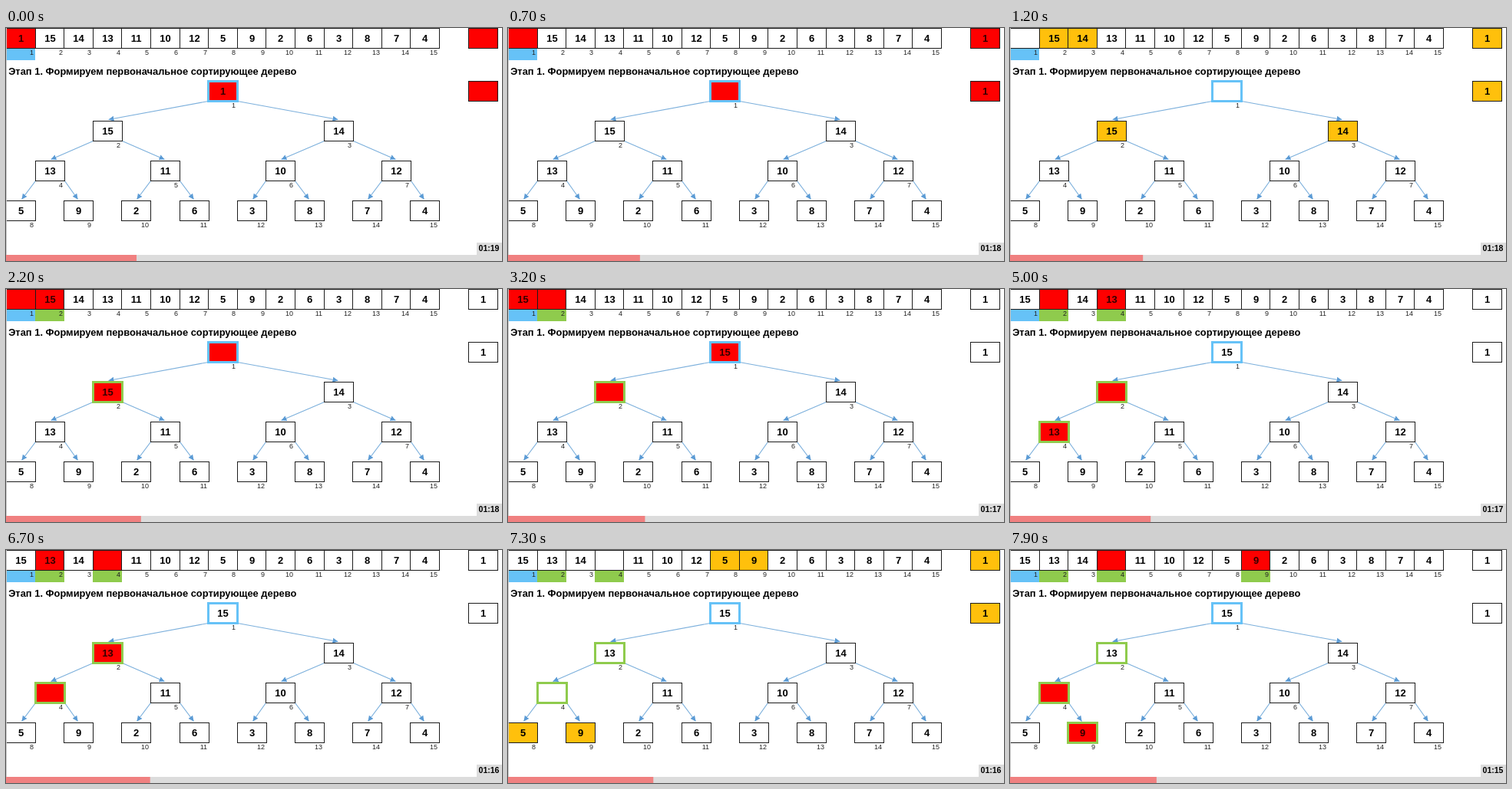
These frames come from a looping animation (646 by 304 pixels, 8 s). An HTML page:

```html
<!DOCTYPE html>
<html lang="ru">
<head>
<meta charset="utf-8">
<style>
  html, body { margin: 0; width: 100%; height: 100%; overflow: hidden; background: #fff; }
  svg { display: block; font-family: "Liberation Sans", Arial, sans-serif; }
  .value { font-size: 13px; font-weight: bold; text-anchor: middle; }
  .title { font-size: 12.9px; font-weight: bold; }
  .index { font-size: 9px; text-anchor: end; fill: #222; }
  .clock { font-size: 10.5px; font-weight: bold; text-anchor: middle; }
  .arrow { stroke: #7db0dc; stroke-width: 1.2; marker-end: url(#head); }
</style>
</head>
<body>
<svg width="646" height="304" viewBox="0 0 646 304">
  <defs>
    <marker id="head" markerUnits="userSpaceOnUse" markerWidth="8" markerHeight="8"
            refX="7" refY="3.5" orient="auto">
      <path d="M0 0L7 3.5L0 7z" fill="#5b9bd5"/>
    </marker>
  </defs>
  <text class="title" x="3.2" y="61">Этап 1. Формируем первоначальное сортирующее дерево</text>
  <g id="arrows"></g>
  <g id="cells"></g>
  <path d="M.5 0V296" stroke="#c4c4c4"/>
  <rect x="613" y="280" width="33" height="16" fill="#dcdcdc"/>
  <text class="clock" id="clock" x="629" y="291"></text>
  <rect y="296" width="646" height="8" fill="#dcdcdc"/>
  <rect id="bar" y="296" height="8" fill="#f08080"/>
</svg>
<script>
const LOOP = 8000, STEP = 950, LEAD = 800, CELL = 37.6;
const RED = '#fe0000', AMBER = '#ffc00c', BLUE = '#66c2f7', GREEN = '#8fcb4d', INK = '#1c1c1c';
const START = [1, 1, 15, 14, 13, 11, 10, 12, 5, 9, 2, 6, 3, 8, 7, 4];
const HOLES = [0, 1, 2, 4];   // slot 0 is the buffer on the right
const TRAIL = [1, 2, 4, 9];
const LIT = [[0, 1], [0, 1], [0, 2, 3], [1, 2], [1, 2], [0, 4, 5], [2, 4], [2, 4], [0, 8, 9], [4, 9]];
const $ = id => document.getElementById(id);

const left = col => Math.round(col * CELL) + .5;

// Left and top edge of a tree node
function node(i) {
  if (!i) return { x: left(16), y: 69.5 };
  const depth = Math.floor(Math.log2(i));
  const span = 16 >> depth;
  return { x: left((i - 2 ** depth) * span + span / 2 - 1), y: 69.5 + 52 * depth };
}

function drawArrows() {
  let out = '';
  for (let i = 2; i < 16; i++) {
    const from = node(i >> 1), to = node(i);
    out += `<line class="arrow" x1="${from.x + (i % 2 ? 38 : 0)}" y1="${from.y + 26}"
      x2="${to.x + (i % 2 ? 18 : 20)}" y2="${to.y - 2}"/>`;
  }
  $('arrows').innerHTML = out;
}

const box = (x, y, fill, stroke, width) =>
  `<rect x="${x}" y="${y}" width="38" height="26" fill="${fill}" stroke="${stroke}" stroke-width="${width}"/>`;
const value = (x, y, text, fill) =>
  `<text class="value" x="${x + 19}" y="${y + 17.5}" fill="${fill === RED ? '#300' : '#000'}">${text}</text>`;
const index = (x, y, i) => i ? `<text class="index" x="${x + 35.5}" y="${y + 34.8}">${i}</text>` : '';

function drawCells(step) {
  const shifts = Math.floor((step + 2) / 3);
  const values = [...START];
  for (let k = 1; k <= shifts; k++) values[HOLES[k - 1]] = values[HOLES[k]];
  values[HOLES[shifts]] = '';
  const trail = TRAIL.slice(0, 1 + Math.floor(step / 3));
  const glow = step % 3 === 2 ? AMBER : RED;

  let row = '', tree = '';
  values.forEach((text, i) => {
    const fill = LIT[step].includes(i) ? glow : '#fff';
    const mark = trail.includes(i) && (i === 1 ? BLUE : GREEN);
    const x = left(i ? i - 1 : 16), { x: nx, y: ny } = node(i);
    if (mark) row += `<rect x="${x - .5}" y="27" width="38" height="15" fill="${mark}"/>`;
    row += box(x, .5, fill, INK, 1) + value(x, .5, text, fill) + index(x, .5, i);
    tree += box(nx, ny, fill, mark || INK, mark ? 3 : 1) + value(nx, ny, text, fill) + index(nx, ny, i);
  });
  $('cells').innerHTML = row + tree;
}

let shown = -1;
function frame(now) {
  const t = now % LOOP;
  const step = Math.floor((t + LEAD) / STEP);
  if (step !== shown) drawCells(shown = step);
  $('clock').textContent = '01:' + (19 - Math.floor((t + 1630) / 2290));
  $('bar').setAttribute('width', 170 + t * .00264);
  requestAnimationFrame(frame);
}

drawArrows();
frame(0);
</script>
</body>
</html>
```
